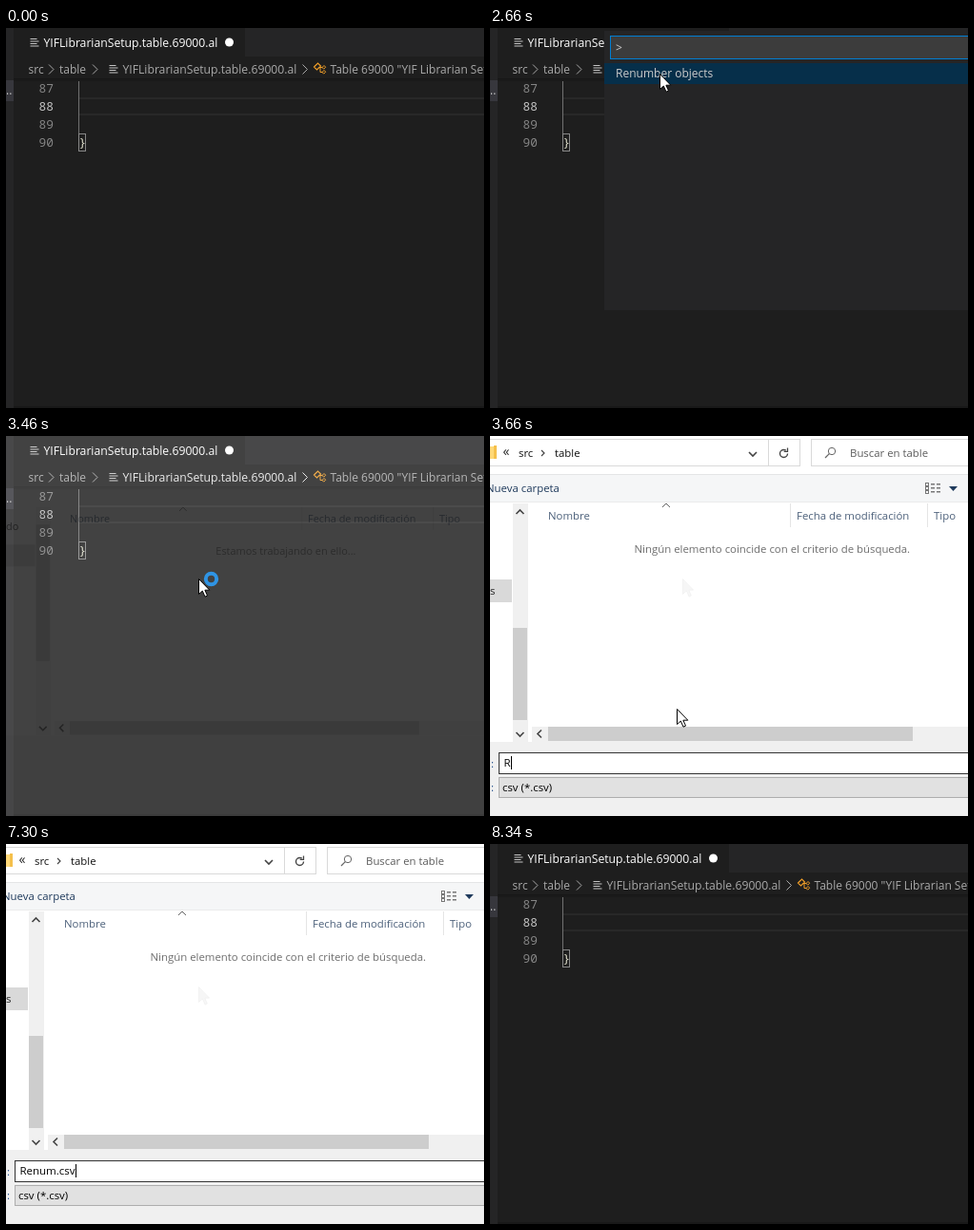
Write an HTML page with a canvas that moves like this. It is 502 px wide and 400 px high and loops after 8.74 s.

```html
<!DOCTYPE html>
<html lang="es">
<head>
<meta charset="utf-8">
<title>Guardar como</title>
<style>
  html, body { margin: 0; width: 100%; height: 100%; overflow: hidden; background: #1e1e1e; }
  canvas { display: block; }
</style>
</head>
<body>
<canvas id="stage" width="502" height="400"></canvas>
<script>
const stage = document.getElementById('stage').getContext('2d');
const overlay = new OffscreenCanvas(502, 400).getContext('2d');
let ctx = stage;

const LOOP = 8740;
const FILE = 'YIFLibrarianSetup.table.69000.al';
const SANS = '"Open Sans", "Noto Sans", sans-serif';
const MONO = '"Noto Sans Mono", "DejaVu Sans Mono", monospace';

// Each step keeps its state until the next one: [start, state]
const beam = (x, y, more) => ({ beam: [x, y], ...more });
const arrow = (x, y, more) => ({ arrow: [x, y], ...more });
const typed = (text, caret = true) => ({ dialog: true, text, caret });
const steps = [
  [0, {}],
  [630, beam(215, 248)],
  [830, beam(190, 192)],
  [1030, beam(138, 112)],
  [1240, arrow(66, 44, { hover: 'table' })],
  [1450, beam(80, 68)],
  [1660, beam(94, 80)],
  [1860, beam(94, 80, { caret: true })],
  [2060, beam(94, 80)],
  [2260, beam(94, 80, { palette: true })],
  [2460, arrow(130, 62, { palette: true })],
  [2660, arrow(178, 48, { palette: true })],
  [2860, arrow(200, 42, { palette: true })],
  [3070, arrow(200, 42, { hover: 'file', caret: true })],
  [3270, arrow(200, 42, { hover: 'file', caret: true, busy: true })],
  [3460, arrow(202, 150, { hover: 'file', busy: true, opening: true })],
  [3660, arrow(196, 287, typed('R'))],
  [4060, typed('Re')],
  [4260, typed('Ren')],
  [4460, typed('Renu')],
  [4660, typed('Renum')],
  [5270, typed('Renum', false)],
  [5480, typed('Renum.')],
  [5690, typed('Renum.c')],
  [6290, typed('Renum.cs')],
  [6890, typed('Renum.cs', false)],
  [7300, typed('Renum.csv')],
  [7720, beam(198, 288, { caret: true })],
  [8140, beam(198, 288)],
  [8340, {}]
];

function rect(x, y, w, h, color) {
  ctx.fillStyle = color;
  ctx.fillRect(x, y, w, h);
}

function frame(x, y, w, h, color, fill) {
  if (fill) rect(x, y, w, h, fill);
  ctx.strokeStyle = color;
  ctx.lineWidth = 1;
  ctx.strokeRect(x + 0.5, y + 0.5, w - 1, h - 1);
}

function label(text, x, y, color, size = 11.4, family = SANS) {
  ctx.font = `${size}px ${family}`;
  ctx.fillStyle = color;
  ctx.fillText(text, x, y);
}

function line(points, color, width = 1) {
  ctx.beginPath();
  points.forEach(([x, y]) => ctx.lineTo(x, y));
  ctx.strokeStyle = color;
  ctx.lineWidth = width;
  ctx.stroke();
}

function ring(x, y, r, color, width, from = 0, to = Math.PI * 2) {
  ctx.beginPath();
  ctx.arc(x, y, r, from, to);
  ctx.strokeStyle = color;
  ctx.lineWidth = width;
  ctx.stroke();
}

// Angle bracket with its tip at x, y, opening towards dx, dy
function chevron(x, y, dx, dy, color, width = 1.2) {
  const a = dx ? [x + dx, y - dx] : [x - dy, y + dy];
  const b = dx ? [x + dx, y + dx] : [x + dy, y + dy];
  line([a, [x, y], b], color, width);
}

function fileIcon(x, y) {
  [7, 9, 7, 9].forEach((w, i) => rect(x, y + i * 2.5, w, 1, '#c5c5c5'));
}

function classIcon(x, y) {
  const color = '#ee9d28';
  line([[x + 1, y + 5], [x + 5, y + 1], [x + 8, y + 4], [x + 4, y + 8], [x + 1, y + 5], [x + 2, y + 4]], color, 1.2);
  line([[x + 6.5, y + 5.5], [x + 10, y + 5.5]], color);
  line([[x + 7.5, y + 5.5], [x + 7.5, y + 10.5], [x + 10, y + 10.5]], color);
  for (const cy of [y + 5.5, y + 10.5]) {
    line([[x + 9.5, cy], [x + 11.5, cy - 2], [x + 13.2, cy - 0.3], [x + 11.2, cy + 1.7], [x + 9.5, cy]], color);
  }
}

function editor(s) {
  const dim = '#a9a9a9', bright = '#e8e8e8';
  const fileColor = s.hover === 'file' ? bright : dim;
  rect(0, 0, 502, 400, '#1e1e1e');
  rect(0, 0, 8, 400, '#252526');
  rect(251, 0, 251, 30, '#252526');
  rect(0, 55, 8, 22, '#37373d');
  label('..', 0, 70, '#cccccc', 12);

  // Code
  rect(77, 73, 425, 2, '#282828');
  rect(77, 90, 425, 2, '#282828');
  for (let i = 0; i < 4; i++) {
    label(87 + i, 34.5, 68 + i * 19, i === 1 ? '#c6c6c6' : '#858585', 12.8, MONO);
  }
  rect(76, 55, 1, 56, '#707070');
  frame(76, 111, 8, 19, '#888888');
  label('}', 76.5, 125, '#dcdcc8', 12.8, MONO);
  if (s.caret) rect(76, 73, 2, 19, '#aeafad');

  // Tab and breadcrumbs
  rect(8, 53, 494, 1, '#171717');
  rect(8, 54, 494, 2, '#1a1a1a');
  fileIcon(25.5, 11);
  label(FILE, 39.5, 19.5, '#ffffff', 12.2);
  ctx.beginPath();
  ctx.arc(234.5, 15, 4.5, 0, 7);
  ctx.fill();
  label('src', 23.5, 48, dim, 12);
  chevron(50, 43.5, -5, 0, dim, 1);
  label('table', 56, 48, s.hover === 'table' ? bright : dim, 12);
  chevron(96, 43.5, -5, 0, dim, 1);
  fileIcon(108.5, 39);
  label(FILE, 122.5, 48, fileColor, 12.2);
  chevron(316.5, 43.5, -5, 0, fileColor, 1);
  classIcon(322.5, 36);
  label('Table 69000 "YIF Librarian Setup"', 340.5, 48, dim, 12);
  rect(8, 398, 494, 2, '#191919');
}

function palette() {
  rect(120, 3, 382, 294, '#252526');
  frame(126, 8, 380, 25, '#007fd4', '#3c3c3c');
  label('>', 132, 25, '#cccccc', 12);
  rect(120, 37, 382, 22, '#062f4a');
  label('Renumber objects', 132, 52, '#cccccc', 12);
}

const INK = '#4c607a', DARK = '#444444', TRACK = '#f0f0f0', THUMB = '#cdcdcd';

function addressBar() {
  frame(-10, 3, 336, 29, '#d9d9d9');
  rect(292, 3, 1, 29, '#d9d9d9');
  rect(-4, 11, 11, 13, '#ffd978');
  rect(4, 10, 3, 14, '#f5c04c');
  label('«', 13.5, 21, '#222222', 14);
  label('src', 30, 22, '#111111');
  chevron(57, 18, -3, 0, DARK);
  label('table', 68, 22, '#111111');
  chevron(276, 21, 0, -4, DARK, 1.6);
  ring(308.5, 18.5, 4, DARK, 1.4, 0, 5.3);
  line([[312.5, 12.5], [312.5, 16.3], [308.7, 16.3]], DARK, 1.3);
  frame(337, 3, 185, 29, '#d9d9d9');
  ring(359, 16, 3.7, '#666666', 1);
  line([[356.3, 18.7], [352, 23]], '#666666', 1.2);
  label('Buscar en table', 378, 22, '#5c5c5c');
}

function toolbar() {
  rect(-20, 40, 560, 30, '#f5f6f7');
  rect(-20, 40, 560, 1, '#e4e5e6');
  rect(-20, 69, 560, 1, '#ebebeb');
  label('Nueva carpeta', -4, 59, '#1e395b');
  for (let y = 49; y < 60; y += 4) {
    frame(457, y, 4, 4, '#777777');
    rect(463, y + 1, 4, 1.5, '#777777');
    rect(469, y + 1, 4, 1.5, '#777777');
  }
  ctx.beginPath();
  ctx.moveTo(482, 53);
  ctx.lineTo(491, 53);
  ctx.lineTo(486.5, 58);
  ctx.fillStyle = '#1e395b';
  ctx.fill();
}

function folderList(opening) {
  chevron(185, 71, 0, 4, '#666666', 1);
  label('Nombre', 61, 88, INK);
  label('Fecha de modificación', 322, 88, INK);
  label('Tipo', 466, 88, INK);
  rect(315, 71, 1, 25, '#e5e5e5');
  rect(459, 71, 1, 25, '#e5e5e5');
  if (opening) label('Estamos trabajando en ello...', 221, 123, '#6d6d6d');
  else label('Ningún elemento coincide con el criterio de búsqueda.', 151.5, 123, '#6d6d6d');

  // Navigation pane and scrollbars
  const [rowTop, thumbTop, thumbEnd] = opening ? [112, 90, 240] : [151, 202, 299];
  rect(-20, rowTop, 43, 24, '#d9d9d9');
  if (opening) label('do', -9, 96, '#222222');
  else label('s', 0, 167, '#222222');
  rect(24, 71, 16, 251, TRACK);
  rect(24, thumbTop, 15, thumbEnd - thumbTop, THUMB);
  chevron(31.5, 78, 0, 4, DARK, 1.6);
  chevron(31.5, 316, 0, -4, DARK, 1.6);
  rect(44, 306, 480, 16, TRACK);
  rect(61, 306, 383, 15, THUMB);
  chevron(50, 313.5, 4, 0, DARK, 1.6);
}

function fileFields(s) {
  label(':', 1, 349, '#1e4d8c');
  label(':', 1, 374, '#1e4d8c');
  frame(9, 333, 520, 23, '#333333', '#ffffff');
  label(s.text, 14.4, 348, '#000000', 11.5);
  if (s.caret) rect(Math.round(14.4 + ctx.measureText(s.text).width), 337, 1, 14, '#000000');
  frame(9, 359, 520, 22, '#adadad', '#e1e1e1');
  label('csv (*.csv)', 13, 374, '#000000');
}

function dialog(s) {
  rect(-20, -20, 560, 460, '#ffffff');
  rect(-20, 322, 560, 118, TRACK);
  folderList(s.opening);
  if (s.opening) return;
  addressBar();
  toolbar();
  fileFields(s);
  ctx.globalAlpha = 0.035;
  pointer(202, 150, '#000000');
  ctx.globalAlpha = 1;
}

// The window appears slightly smaller and mostly transparent
function openingDialog(s) {
  ctx = overlay;
  ctx.setTransform(0.958, 0, 0, 0.958, 8.6, 7);
  dialog(s);
  ctx = stage;
  ctx.globalAlpha = 0.16;
  ctx.drawImage(overlay.canvas, 0, 0);
  ctx.globalAlpha = 1;
}

function pointer(x, y, fill = '#ffffff') {
  const shape = [[0, 0], [0, 16], [3.8, 12.6], [6.5, 18.7], [9, 17.6], [6.4, 11.7], [11.3, 11.7]];
  ctx.beginPath();
  shape.forEach(([px, py]) => ctx.lineTo(x + 0.5 + px, y + 0.5 + py));
  ctx.closePath();
  ctx.fillStyle = fill;
  ctx.fill();
  ctx.strokeStyle = '#000000';
  ctx.lineWidth = 1;
  ctx.stroke();
}

function textBeam(x, y) {
  for (const [color, width] of [['#000000', 3], ['#e6e6e6', 1]]) {
    line([[x + 0.5, y - 8], [x + 0.5, y + 7]], color, width);
    for (const dy of [-8, 7]) line([[x - 3, y + dy + 0.5], [x + 4, y + dy + 0.5]], color, width);
  }
}

function draw(t) {
  const s = steps.findLast(([start]) => start <= t)[1];
  if (s.dialog) dialog(s);
  else editor(s);
  if (s.palette) palette();
  if (s.opening) openingDialog(s);
  if (s.beam) textBeam(...s.beam);
  if (s.arrow) {
    const [x, y] = s.arrow;
    pointer(x, y);
    if (s.busy) ring(x + 13.5, y + 0.5, 5.7, '#2f94e4', 4);
  }
}

const begin = performance.now();
function tick() {
  draw((performance.now() - begin) % LOOP);
  requestAnimationFrame(tick);
}
tick();
</script>
</body>
</html>
```
